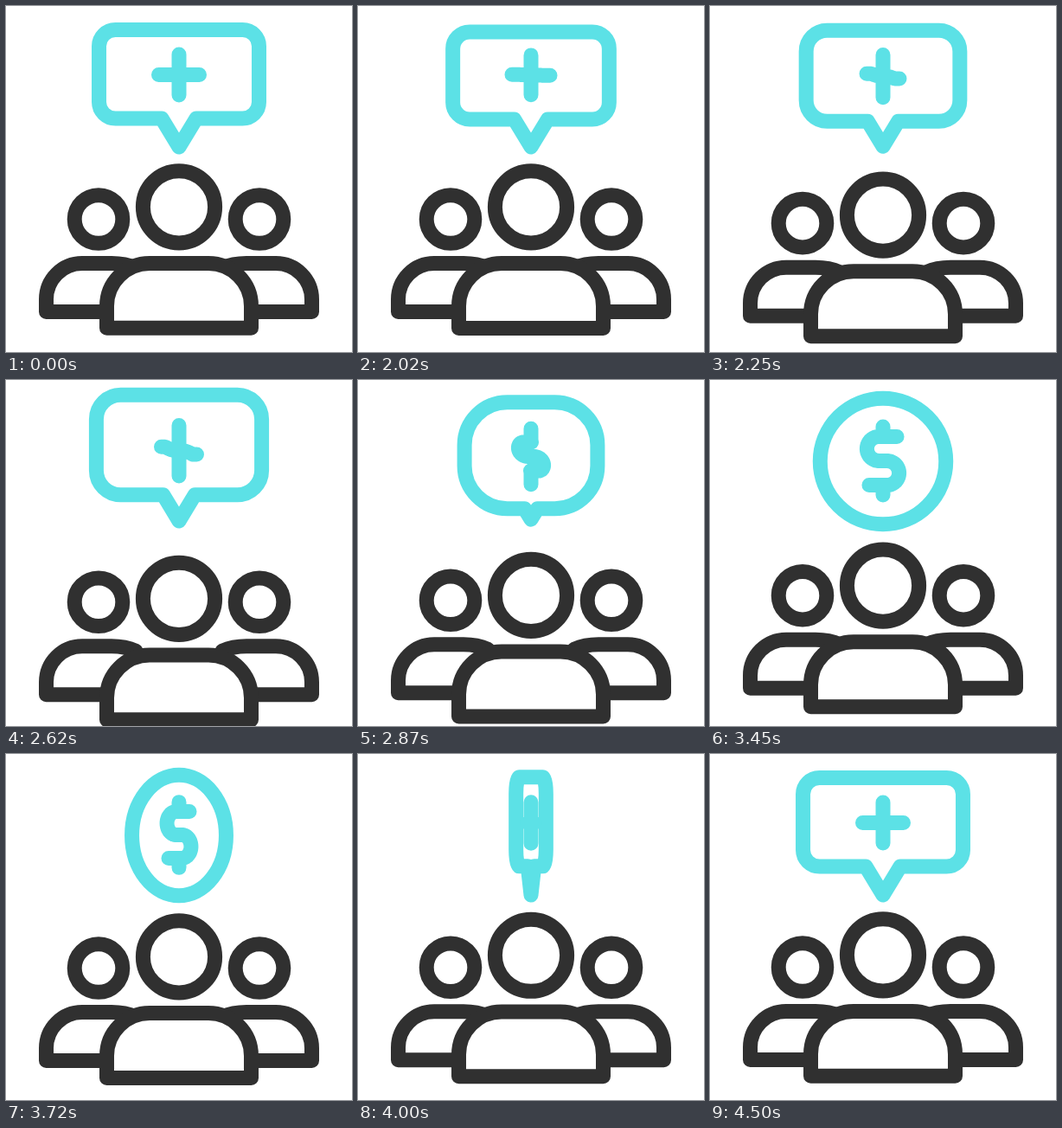
These frames come from a looping animation (400x400 px, 4520 ms). An HTML page with a canvas:

```html
<!DOCTYPE html>
<html lang="en">
<head>
<meta charset="utf-8">
<title>Group and message</title>
<style>
  html, body { margin: 0; width: 100%; height: 100%; overflow: hidden; background: #fff; }
  canvas { display: block; width: 400px; height: 400px; }
</style>
</head>
<body>
<canvas id="stage" width="400" height="400"></canvas>
<script>
const ctx = document.getElementById('stage').getContext('2d');
const LOOP = 4520, REST = 2020, CX = 200;
const DARK = '#303030', CYAN = '#5ce1e6';

const lerp = (a, b, p) => a + (b - a) * p;
const progress = (t, from, to) => Math.min(1, Math.max(0, (t - from) / (to - from)));
const ease = (t, from, to) => (1 - Math.cos(Math.PI * progress(t, from, to))) / 2;
const bump = (t, from, peak, to) => ease(t, from, peak) * (1 - ease(t, peak, to));

// How far the people have ducked: a quick dip and a slow recovery.
function duck(t) {
  const recovery = 1 - progress(t, 2540, LOOP) ** 1.6;
  return 21 * ease(t, 2000, 2540) * recovery ** 4;
}

// 0 is the speech bubble with a plus, 1 is the coin with a dollar.
function coinShare(t) {
  const hint = 0.13 * (1 - (1 - progress(t, 2000, 2560)) ** 4);
  return lerp(hint, 1, ease(t, 2560, 3120));
}

// Overall size: a short shrink, then a swell before each change.
function swell(t) {
  return 1 - 0.07 * Math.sin(Math.PI * progress(t, 2000, 2260))
    + 0.09 * bump(t, 2200, 2540, 3160)
    + 0.15 * bump(t, 3160, 3480, 4080);
}

function signPose(t) {
  const turn = Math.cos(Math.PI * ease(t, 3350, 4560));
  const m = turn < 0 ? 0 : coinShare(t);
  return { m, turn: Math.max(0.001, Math.abs(turn)), size: swell(t) };
}

// Scales the path only, so that the line weight stays the same.
function strokeScaled(sx, sy, y, trace) {
  ctx.save();
  ctx.translate(CX, y);
  ctx.scale(sx, sy);
  ctx.translate(0, -y);
  ctx.beginPath();
  trace();
  ctx.restore();
  ctx.stroke();
}

function traceFrame(m) {
  const w = lerp(92.5, 63.5, m), r = lerp(19, 63.5, m), tail = 20 * (1 - m);
  const top = lerp(27.5, 30.5, m), bottom = lerp(130, 157.5, m);
  ctx.moveTo(0, lerp(163, 157.5, m));
  ctx.lineTo(-tail, bottom);
  ctx.arcTo(-w, bottom, -w, top, r);
  ctx.arcTo(-w, top, w, top, r);
  ctx.arcTo(w, top, w, bottom, r);
  ctx.arcTo(w, bottom, 0, bottom, r);
  ctx.lineTo(tail, bottom);
  ctx.closePath();
}

// Point on the upper half of the S, at a distance along it from its middle.
function curlPoint(d) {
  const r = 12.25, neck = 4, bend = Math.PI * r;
  if (d < neck) return [-d, 0];
  if (d > neck + bend) return [d - bend - 2 * neck, -2 * r];
  const angle = (d - neck) / r;
  return [-neck - r * Math.sin(angle), -r + r * Math.cos(angle)];
}

function traceMark(m, y) {
  const steps = 40, length = 60.5;
  for (let i = -steps; i <= steps; i++) {
    const side = Math.sign(i), s = Math.abs(i) / steps;
    const [cx, cy] = curlPoint(s * length);
    ctx.lineTo(side * lerp(-23.5 * s, cx, m), y + side * cy * m);
  }
  for (const side of [-1, 1]) {
    ctx.moveTo(0, y + side * lerp(0, 24.5, m));
    ctx.lineTo(0, y + side * lerp(23.5, 34.5, m));
  }
}

function drawSign(t) {
  const { m, turn, size } = signPose(t);
  const markSize = 1 + (size - 1) * lerp(2, 1, m), markY = lerp(79.5, 93.5, m);
  ctx.strokeStyle = CYAN;
  strokeScaled(size * turn, size, lerp(163, 94, m), () => traceFrame(m));
  strokeScaled(markSize * turn, markSize, markY, () => traceMark(m, markY));
}

function drawHead(x, y, r) {
  ctx.beginPath();
  ctx.arc(x, y, r, 0, 2 * Math.PI);
  ctx.stroke();
}

function drawSidePerson(direction, dy) {
  ctx.save();
  ctx.translate(CX, dy);
  ctx.scale(direction, 1);
  drawHead(93, 246.5, 27.8);
  ctx.beginPath();
  ctx.moveTo(86, 353.5);
  ctx.lineTo(153.5, 353.5);
  ctx.lineTo(153.5, 339);
  ctx.arcTo(153.5, 297.5, 112, 297.5, 41.5);
  ctx.lineTo(78, 297.5);
  ctx.quadraticCurveTo(62, 297.5, 50, 303);
  ctx.stroke();
  ctx.restore();
}

function drawCentrePerson(dy) {
  ctx.save();
  ctx.translate(CX, dy);
  drawHead(0, 232.3, 41.6);
  ctx.beginPath();
  ctx.moveTo(-83.5, 372.3);
  ctx.arcTo(-83.5, 297.5, 0, 297.5, 49.5);
  ctx.arcTo(83.5, 297.5, 83.5, 372.3, 49.5);
  ctx.lineTo(83.5, 372.3);
  ctx.closePath();
  ctx.fill();
  ctx.stroke();
  ctx.restore();
}

function draw(t) {
  ctx.fillStyle = '#fff';
  ctx.fillRect(0, 0, 400, 400);
  ctx.lineWidth = 17;
  ctx.lineCap = ctx.lineJoin = 'round';
  const time = t < REST ? 0 : t, dy = duck(time);
  drawSign(time);
  ctx.strokeStyle = DARK;
  drawSidePerson(-1, dy / 2);
  drawSidePerson(1, dy / 2);
  drawCentrePerson(dy);
}

const start = performance.now();
function tick() {
  draw((performance.now() - start) % LOOP);
  requestAnimationFrame(tick);
}
tick();
</script>
</body>
</html>
```
